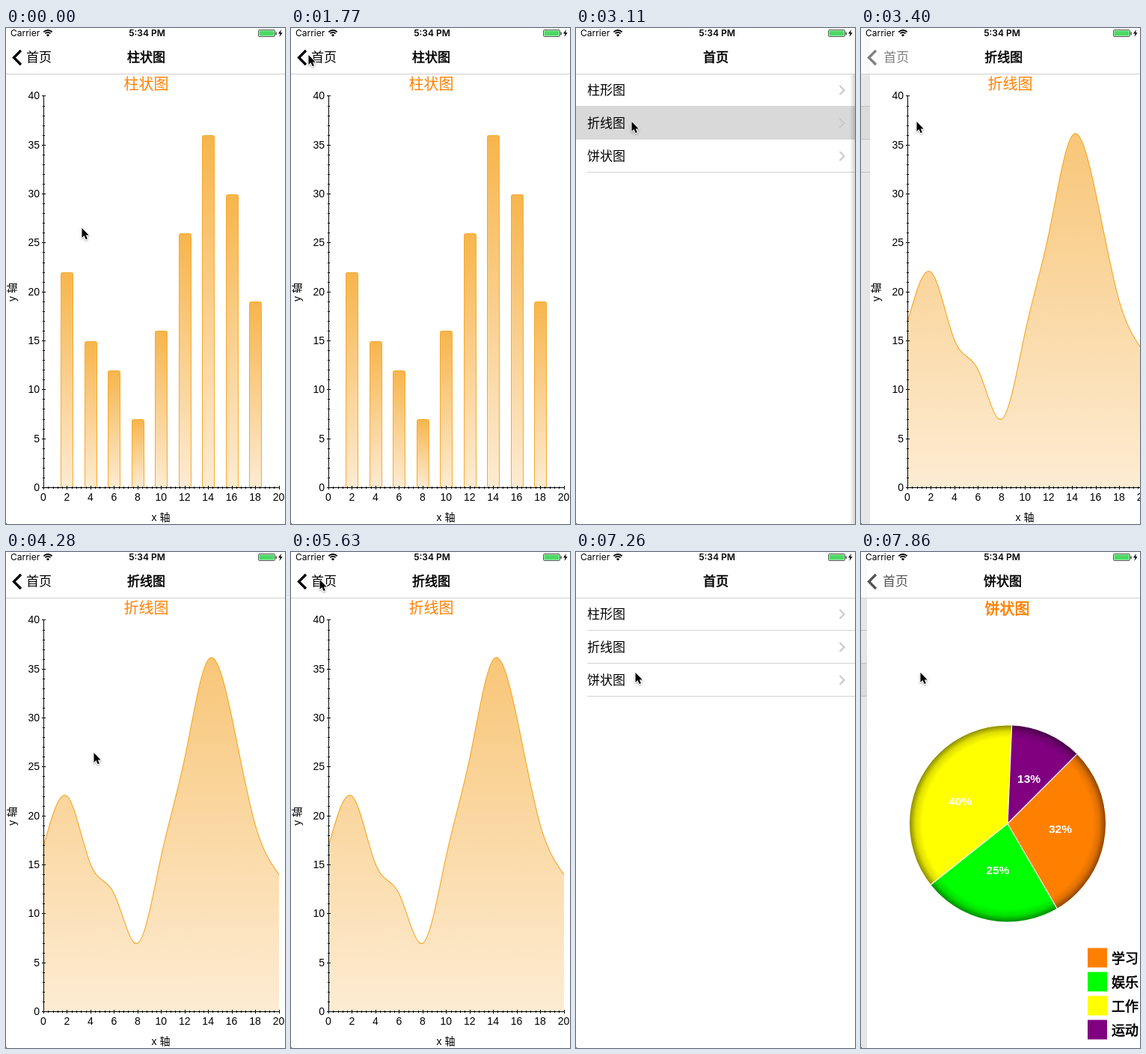
These frames come from a looping animation (373 by 662 pixels, 8000 ms). An HTML page with a canvas:

```html
<!DOCTYPE html>
<html lang="zh">
<head>
<meta charset="utf-8">
<style>
html, body { margin: 0; width: 100%; height: 100%; overflow: hidden; background: #fff; }
canvas { display: block; }
</style>
</head>
<body>
<canvas id="stage" width="373" height="662"></canvas>
<script>
const W = 373, H = 662, LOOP = 8000;
const c = document.getElementById('stage').getContext('2d');
const CJK = '"Noto Sans CJK SC","Noto Sans CJK",sans-serif';
const LABEL = '"Liberation Sans",' + CJK;
const STATUS = 'Inter,sans-serif';

// Screen updates: [first, last, count]
const steps = [
  [0, 0, 1], [140, 870, 6], [1170, 1770, 5], [2070, 2810, 6], [3110, 4140, 8], [4280, 4280, 1],
  [4580, 4880, 3], [5180, 5180, 1], [5480, 5630, 2], [6380, 7260, 7], [7560, 7860, 3]
].flatMap(([a, b, n]) => Array.from({ length: n }, (_, i) =>
  Math.floor((a + (n > 1 ? (b - a) * i / (n - 1) : 0)) / 10) * 10));

// Pointer path: [time, x, y]
const path = [
  [0, 101, 267], [290, 113, 279], [870, 57, 160], [1020, 57, 160], [1620, 21, 40], [1770, 23, 36],
  [2220, 23, 36], [2810, 74, 125], [3400, 74, 125], [4140, 115, 268], [4280, 117, 268],
  [4430, 117, 268], [4880, 112, 190], [5480, 34, 35], [5630, 38, 37], [6530, 38, 37],
  [7260, 79, 161], [LOOP, 79, 161]
];

// Navigation: which page slides, when, and in which direction
const moves = [
  { at: -2000, page: 0, push: true }, { at: 2010, page: 0 }, { at: 3110, page: 1, push: true },
  { at: 6330, page: 1 }, { at: 7543, page: 2, push: true }
];
const rows = ['柱形图', '折线图', '饼状图'];
const pages = [
  { title: '柱状图', draw: barChart },
  { title: '折线图', draw: lineChart },
  { title: '饼状图', draw: pieChart }
];

const px = v => 50.5 + v * 15.725;
const py = v => 613.5 - v * 13.063;

// "heavy" thickens the strokes to a medium weight
function text(s, x, y, size, { color = '#000', align = 'left', family = CJK, weight = 400, heavy = 0 } = {}) {
  c.font = `${weight} ${size}px ${family}`;
  c.fillStyle = color;
  c.textAlign = align;
  c.textBaseline = 'middle';
  c.fillText(s, x, y);
  if (heavy) {
    c.strokeStyle = color;
    c.lineWidth = heavy;
    c.strokeText(s, x, y);
  }
}

function poly(points, color, width) {
  c.beginPath();
  points.forEach(([x, y]) => c.lineTo(x, y));
  if (width) stroke(color, width);
  else { c.closePath(); c.fillStyle = color; c.fill(); }
}

function stroke(color, width = 1) {
  c.strokeStyle = color;
  c.lineWidth = width;
  c.stroke();
}

function rect(x, y, w, h, color) {
  c.fillStyle = color;
  c.fillRect(x, y, w, h);
}

function fade(y0, y1, top, bottom) {
  const g = c.createLinearGradient(0, y0, 0, y1);
  g.addColorStop(0, top);
  g.addColorStop(1, bottom);
  return g;
}

function axes(title) {
  c.beginPath();
  c.moveTo(50.5, py(40)); c.lineTo(50.5, 613.5); c.lineTo(px(20), 613.5);
  for (let i = 0; i <= 40; i++) {
    const r = i % 5 ? 1.5 : 2.5, y = Math.floor(py(i)) + .5;
    c.moveTo(50.5 - r, y); c.lineTo(50.5 + r, y);
  }
  for (let i = 0; i <= 50; i++) {
    const r = i % 5 ? 1.5 : 2.5, x = Math.floor(px(i * .4)) + .5;
    c.moveTo(x, 613.5 - r); c.lineTo(x, 613.5 + r);
  }
  stroke('#000');
  for (let v = 0; v <= 40; v += 5) text(v, 45, py(v) + .5, 14, { align: 'right', family: LABEL });
  for (let v = 0; v <= 20; v += 2) text(v, px(v) - .5, 627, 14, { align: 'center', family: LABEL });
  text('x 轴', 207, 654, 14, { align: 'center', family: LABEL });
  c.save();
  c.translate(9, 352.5);
  c.rotate(-Math.PI / 2);
  text('y 轴', 0, 0, 14, { align: 'center', family: LABEL });
  c.restore();
  text(title, 187.5, 74, 20, { color: '#ff8000', align: 'center' });
}

function barChart() {
  [22, 15, 12, 7, 16, 26, 36, 30, 19].forEach((v, i) => {
    const x = Math.floor(px(2 * i + 2) - 8) + .5, y = Math.round(py(v)) + .5;
    c.beginPath();
    c.roundRect(x, y, 16, 613.5 - y, [2, 2, 0, 0]);
    c.fillStyle = fade(y, 613, '#f7b54c', '#fdebd2');
    c.fill();
    stroke('#f5ab2e');
  });
  axes('柱状图');
}

// Natural cubic spline through evenly spaced values
const curve = [17, 22, 15, 12, 7, 16, 26, 36, 30, 19, 14];
const slope = curve.map(() => 0);
for (let k = 0; k < 40; k++) {
  const end = curve.length - 1;
  for (let i = 1; i < end; i++)
    slope[i] = (3 * (curve[i + 1] - curve[i - 1]) - slope[i - 1] - slope[i + 1]) / 4;
  slope[0] = (3 * (curve[1] - curve[0]) - slope[1]) / 2;
  slope[end] = (3 * (curve[end] - curve[end - 1]) - slope[end - 1]) / 2;
}

function traceCurve() {
  c.beginPath();
  c.moveTo(px(0), py(curve[0]));
  for (let i = 1; i < curve.length; i++) {
    const x = 2 * i;
    c.bezierCurveTo(px(x - 4 / 3), py(curve[i - 1] + slope[i - 1] / 3),
      px(x - 2 / 3), py(curve[i] - slope[i] / 3), px(x), py(curve[i]));
  }
}

function lineChart() {
  traceCurve();
  c.lineTo(px(20), 613.5);
  c.lineTo(px(0), 613.5);
  c.fillStyle = fade(140, 613, '#f8c678', '#fdecd3');
  c.fill();
  traceCurve();
  stroke('#f5a623', 1.1);
  axes('折线图');
}

function pieChart() {
  const x = 188, y = 362.5, r = 131;
  const slices = [[32, '#ff8000', '学习'], [25, '#00ff00', '娱乐'], [40, '#ffff00', '工作'], [13, '#800080', '运动']];
  const at = a => [x + r * Math.sin(a), y - r * Math.cos(a)];
  const start = Math.PI / 4;
  const sweep = v => v / 110 * 2 * Math.PI;
  let a = start;
  for (const [v, color] of slices) {
    c.beginPath();
    c.moveTo(x, y);
    c.arc(x, y, r, a - Math.PI / 2, a + sweep(v) - Math.PI / 2);
    c.fillStyle = color;
    c.fill();
    a += sweep(v);
  }
  const shade = c.createRadialGradient(x, y, 0, x, y, r);
  [[.87, 0], [.94, .13], [1, .45]].forEach(([p, k]) => shade.addColorStop(p, `rgba(0,0,0,${k})`));
  c.beginPath();
  c.arc(x, y, r, 0, 7);
  c.fillStyle = shade;
  c.fill();
  a = start;
  slices.forEach(([v, color, name], i) => {
    poly([[x, y], at(a)], '#fff', 1.2);
    const mid = a + sweep(v) / 2;
    text(v + '%', x + 71 * Math.sin(mid), y - 64 * Math.cos(mid), 15.5,
      { color: '#fff', align: 'center', family: LABEL, weight: 700 });
    a += sweep(v);
    rect(295, 528.5 + 32 * i, 26, 26, color);
    text(name, 327, 542 + 32 * i, 18, { heavy: .7 });
  });
  text('饼状图', 187.5, 75.5, 20, { color: '#ff8000', align: 'center', heavy: .7 });
}

function list(active, glow) {
  rect(0, 0, W, H, '#fff');
  rows.forEach((name, i) => {
    const y = 83 + 44 * i;
    rect(15, y + 21, W, 1, '#d3d2d6');
    if (i === active && glow > 0) {
      c.globalAlpha = glow;
      rect(0, y + 21 - 44 + (i ? 0 : 1), W, 45, '#d9d9d9');
      c.globalAlpha = 1;
    }
    text(name, 15, y, 17);
    poly([[352.5, y - 6], [358.5, y], [352.5, y + 6]], '#c7c7cc', 2);
  });
}

function navBar(title, q) {
  rect(0, 0, W, 61, 'rgba(255,255,255,.8)');
  rect(0, 61, W, 1, '#cfcfcf');
  const back = Math.max(0, 1 - 16 * q);
  c.globalAlpha = back;
  poly([[20, 30], [10.5, 39.5], [20, 49]], '#000', 3.3);
  text('首页', 27 + 100 * q, 39, 17);
  const head = { align: 'center', heavy: .6 };
  c.globalAlpha = 1 - q;
  text(title, 187.5 + 100 * q, 39, 17, head);
  c.globalAlpha = Math.max(0, 2 * q - 1);
  text('首页', 187 - 120 * (1 - q), 39, 17, head);
  c.globalAlpha = 1;
}

function statusBar() {
  text('Carrier', 6, 7.5, 12, { family: STATUS });
  text('5:34 PM', 188.5, 7.5, 12, { family: STATUS, align: 'center', weight: 600 });
  for (const r of [8, 5]) {
    c.beginPath();
    c.arc(56, 11, r, -Math.PI * .75, -Math.PI * .25);
    stroke('#000', 1.8);
  }
  c.beginPath();
  c.moveTo(56, 11.5);
  c.arc(56, 11.5, 3, -Math.PI * .75, -Math.PI * .25);
  c.fillStyle = '#000';
  c.fill();
  c.beginPath();
  c.roundRect(337.5, 2.5, 22, 9, 1.5);
  stroke('#333', .8);
  rect(338.5, 3.5, 20, 7, '#4cd964');
  rect(360.5, 5.5, 1.3, 3.5, '#333');
  poly([[368, 2], [364, 7.6], [366.6, 7.6], [365.4, 12], [369.6, 6.2], [367, 6.2]], '#000');
}

function pointer(t) {
  if (t >= 5180 && t < 5480) return;
  const i = path.findIndex(k => k[0] > t);
  const [t0, x0, y0] = path[i - 1], [t1, x1, y1] = path[i];
  const k = (t - t0) / (t1 - t0);
  c.save();
  c.translate(Math.round(x0 + (x1 - x0) * k) + .5, Math.round(y0 + (y1 - y0) * k));
  c.scale(.92, .92);
  c.shadowColor = 'rgba(0,0,0,.3)';
  c.shadowBlur = 3;
  c.shadowOffsetY = 1.5;
  c.lineJoin = 'round';
  const arrow = [[0, 0], [0, 14], [3.2, 11], [5.6, 16.4], [8, 15.4], [5.7, 10.2], [10, 10.2]];
  poly([...arrow, arrow[0]], '#fff', 2);
  c.shadowColor = 'transparent';
  poly(arrow, '#000');
  c.restore();
}

// Critically damped spring falling from 1 to 0
const spring = ms => (1 + .0183 * ms) * Math.exp(-.0183 * ms);

function render(t) {
  const { at, page, push } = moves.findLast(m => m.at <= t);
  const rest = spring(t - at);
  let q = push ? rest : 1 - rest;
  if (rest < .002) q = Math.round(q);

  c.save();
  c.translate(-.3 * W * (1 - q), 0);
  // The pressed row fades while its page covers the list
  list(page, push ? .3 + .7 * q : rest < .002 ? 0 : .3 * rest);
  c.restore();
  rect(0, 0, W, H, `rgba(0,0,0,${.1 * (1 - q)})`);

  if (q < 1 || push) {
    c.save();
    c.translate(Math.round(W * q), 0);
    const g = c.createLinearGradient(-7, 0, 0, 0);
    g.addColorStop(0, 'rgba(0,0,0,0)');
    g.addColorStop(1, `rgba(0,0,0,${.17 * q})`);
    rect(-7, 0, 7, H, g);
    rect(0, 0, W, H, '#fff');
    pages[page].draw();
    c.restore();
  }
  navBar(pages[page].title, q);
  statusBar();
  rect(0, 661, 1, 1, '#444');
  pointer(t);
}

function tick(now) {
  const t = now % LOOP;
  render(steps.findLast(s => s <= t));
  requestAnimationFrame(tick);
}
requestAnimationFrame(tick);
</script>
</body>
</html>
```
